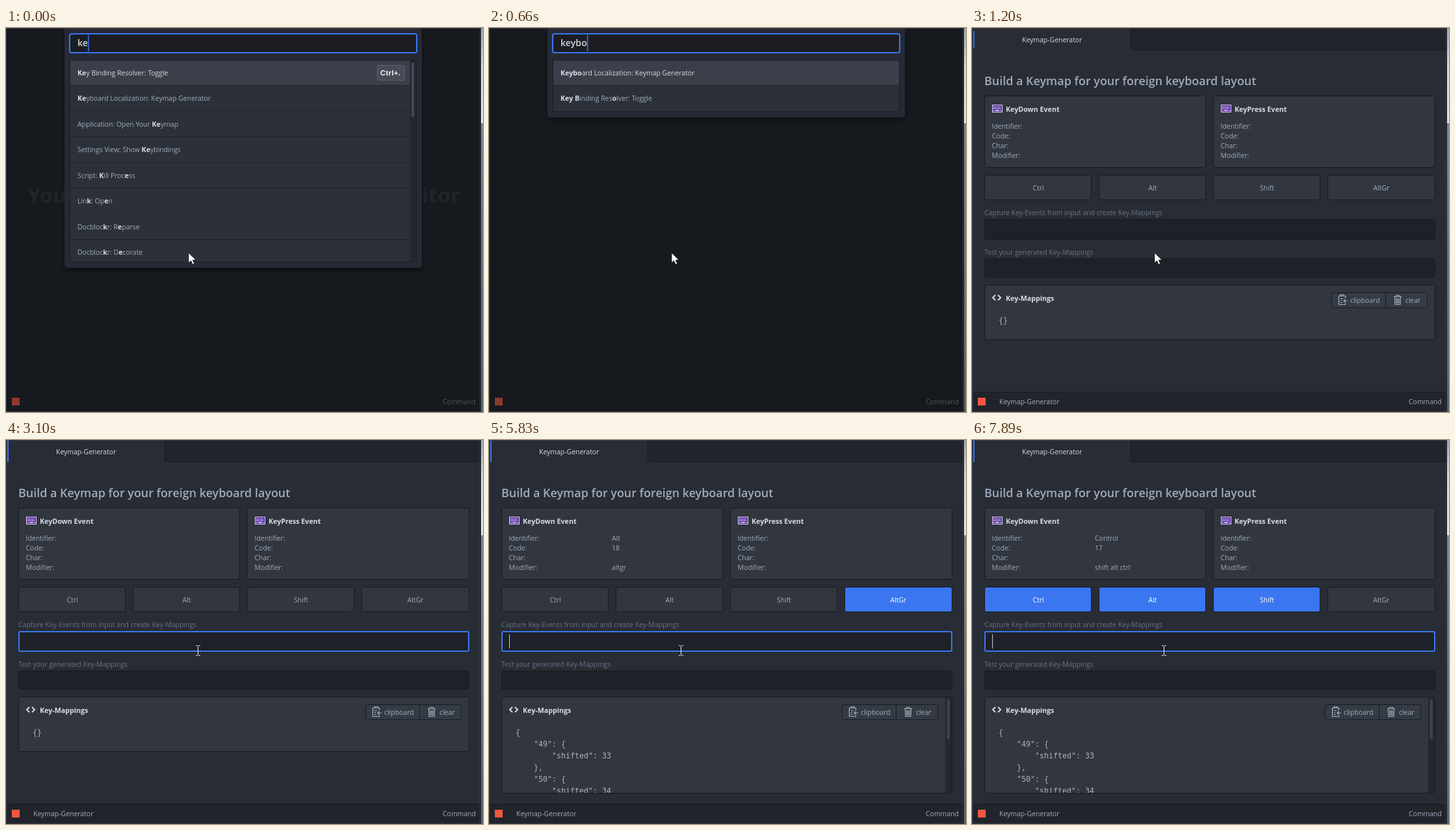
An HTML page that plays this animation: 734 by 591 pixels, repeating every 8 s.

```html
<!DOCTYPE html>
<html lang="en">
<head>
<meta charset="utf-8">
<title>Keymap Generator</title>
<style>
html, body { margin: 0; width: 734px; height: 591px; overflow: hidden; background: #16191d; }
svg { display: block; }
text { font: 10.45px "Open Sans", "Noto Sans", sans-serif; fill: #a1abbc; white-space: pre; }
.bold { font-weight: 700; font-size: 10.7px; fill: #d7dce6; }
.bright { fill: #d7dae0; }
.faint { fill: #6a7384; }
.mid { text-anchor: middle; }
.h1 { font-size: 17.93px; font-weight: 600; }
.tip { font-size: 32.5px; font-weight: 700; fill: #212429; }
.query { font-size: 14.2px; font-weight: 600; fill: #cdd2dc; }
.entry { font-size: 14.2px; fill: #c5cad3; }
.code { font: 11.63px "DejaVu Sans Mono", "Noto Sans Mono", monospace; fill: #abb2bf; }
.kbd { font: 700 11px "Liberation Sans", Arial, sans-serif; letter-spacing: .5px; fill: #fff; }
.card { fill: #31363f; stroke: #181a1f; }
.field { fill: #1e2127; stroke: #181a1f; }
.icon { fill: none; stroke: #a9b2c0; stroke-width: 1.2; }
</style>
</head>
<body>
<svg id="stage" width="734" height="591" viewBox="0 0 734 591"></svg>
<script>
const LOOP = 8000;
const BLUE = '#3a76f0';

const rect = (x, y, w, h, attrs = '') => `<rect x="${x}" y="${y}" width="${w}" height="${h}" ${attrs}/>`;
const text = (x, y, str, cls = '', attrs = '') => `<text x="${x}" y="${y}" class="${cls}" ${attrs}>${str}</text>`;
const path = (d, attrs = '') => `<path d="${d}" ${attrs}/>`;

/* ---------- static parts ---------- */

const defs = `<defs>
  <linearGradient id="light" x2="0" y2="1"><stop stop-color="#a3a7ad"/><stop offset=".4" stop-color="#d6d8da"/><stop offset="1" stop-color="#e4e5e7"/></linearGradient>
  <linearGradient id="slate" x2="0" y2="1"><stop stop-color="#7b8791"/><stop offset="1" stop-color="#586570"/></linearGradient>
  <filter id="shadow" x="-10%" y="-10%" width="120%" height="130%"><feDropShadow dx="0" dy="4" stdDeviation="4" flood-opacity=".4"/></filter>
  <clipPath id="listClip">${rect(98, 49, 535, 312)}</clipPath>
  <clipPath id="codeClip">${rect(20, 396, 692, 147)}</clipPath>
</defs>`;

const desktop = rect(730, 0, 4, 148, 'fill="url(#light)"') + rect(730, 148, 4, 443, 'fill="url(#slate)"')
  + rect(730, 147, 4, 1, 'fill="#4b5057"') + rect(730, 0, 1, 591, 'fill="#181b20"');

const frame = rect(.5, .5, 729, 590, 'fill="none" stroke="#343b47"');

const finder = `<g id="finder">
  ${rect(0, 0, 730, 591, 'fill="#16191d"')}
  <g id="tip">${text(33, 269, 'You can run tools', 'tip')}${text(699, 269, 'right in the editor', 'tip', 'text-anchor="end"')}</g>
  ${rect(9, 569, 12, 12, 'fill="#8c3a2e"')}
  ${text(672, 579, 'Command', '', 'style="fill:#50555d"')}
  <g filter="url(#shadow)"><path id="sheet" fill="#282c34"/></g>
  ${rect(98, 9, 534, 29, `rx="3" fill="#1b1d23" stroke="${BLUE}" stroke-width="2"`)}
  ${text(110, 28, '', 'query', 'id="query"')}
  ${rect(0, 11, 1.5, 25, `id="queryCaret" fill="${BLUE}"`)}
  <g id="list" clip-path="url(#listClip)"></g>
</g>`;

const keyboardIcon = x => rect(x + .5, 118.5, 15, 11, 'fill="#54249c" stroke="#dcd8f8"')
  + [121.5, 124].map(y => path(`M${x + 2} ${y}h12`, 'stroke="#f0f1fa" stroke-width="1.4" stroke-dasharray="1.4 1"')).join('')
  + path(`M${x + 2} 127h1.5m1.5 0h6m1.5 0h1.5`, 'stroke="#f0f1fa" stroke-width="1.4"');

const rowY = i => 155 + 15 * i;
const labels = ['Identifier:', 'Code:', 'Char:', 'Modifier:'];

const eventCard = (x, w, title, id) => rect(x + .5, 104.5, w, 110, 'rx="3" class="card"')
  + keyboardIcon(x + 12) + text(x + 33, 129, title, 'bold')
  + labels.map((s, i) => text(x + 11.5, rowY(i), s) + text(x + 170, rowY(i), '', '', `id="${id}${i}"`)).join('');

const modifiers = ['Ctrl', 'Alt', 'Shift', 'AltGr'];
const modifierButton = (name, i) => {
  const x = 19.5 + 176 * i;
  return rect(x, 226.5, i === 3 ? 165 : 164, 38, `rx="3" class="card" id="box${name}"`)
    + text(x + 82.5, 249.8, name, 'mid', `id="label${name}"`);
};

const tools = `<g id="tools">
  ${rect(553.5, 407.5, 147, 23, 'rx="3" fill="#353b45" stroke="#181a1f"')}
  ${path('M636.5 408v22', 'stroke="#181a1f"')}
  <g class="icon">
    ${path('M574.5 416v-3.5h-10v13h10v-2M567 412.5v-2h5v2zM578 420h-6m2.500-2.500l-2.500 2.500 2.500 2.500M567 416.500h4M567 419.500h2M567 422.500h3')}
    ${path('M649 413.5h12M652.500 413v-1.500h5v1.500M650.500 414l.5 11.500h8l.5-11.500M653 416v8M655 416v8M657 416v8')}
  </g>
  ${text(582, 423, 'clipboard')}${text(667, 423, 'clear')}
</g>`;

const tool = `<g id="tool">
  ${rect(0, 0, 730, 591, 'fill="#282c34"')}
  ${rect(245, 1, 485, 32, 'fill="#21252b"')}
  ${path('M244.500 1v32.500H730', 'fill="none" stroke="#181a1f"')}
  ${rect(2, 1, 2, 33, `id="tabMark" fill="${BLUE}"`)}
  ${text(77, 22, 'Keymap-Generator', 'bright')}
  ${rect(1, 560, 729, 30, 'fill="#21252b"')}${rect(1, 560, 729, 1, 'fill="#181a1f"')}
  ${rect(9, 569, 12, 12, 'fill="#f4573f"')}
  ${text(42, 579, 'Keymap-Generator')}${text(672, 579, 'Command')}
  <g id="page">
    ${text(19, 87.5, 'Build a Keymap for your foreign keyboard layout', 'h1')}
    ${eventCard(19, 340, 'KeyDown Event', 'down')}
    ${eventCard(371, 341, 'KeyPress Event', 'press')}
    ${modifiers.map(modifierButton).join('')}
    ${text(19, 288, 'Capture Key-Events from input and create Key-Mappings', 'faint')}
    ${rect(19.5, 294.5, 693, 31, 'rx="3" class="field"')}
    ${rect(20, 295, 692, 30, `rx="2" id="focus" fill="none" stroke="${BLUE}" stroke-width="2"`)}
    ${text(31, 315, '', 'entry', 'id="entry"')}
    ${rect(31, 299, 1, 22, 'id="caret" fill="#c5cad3"')}
    ${text(19, 349, 'Test your generated Key-Mappings', 'faint')}
    ${rect(19.5, 355.5, 693, 28, 'rx="3" class="field"')}
    ${rect(19.5, 395.5, 693, 84, 'rx="3" class="card" id="mapCard"')}
    ${path('M36 411l-4 4 4 4M40 411l4 4-4 4', 'fill="none" stroke="#d7dae0" stroke-width="2"')}
    ${text(52, 420, 'Key-Mappings', 'bold')}
    ${tools}
    <g id="code" clip-path="url(#codeClip)"></g>
    <g id="scroll">
      ${rect(702, 396, 10, 0, 'id="track" fill="#23272e"')}
      ${rect(704.5, 399, 4.500, 0, 'id="thumb" rx="2" fill="#3c424d"')}
    </g>
  </g>
</g>`;

const pointers = path('M0 0v15.500l3.600-3.400 2.500 5.600 2.600-1.100-2.500-5.500h5z', 'id="arrow" fill="#fff" stroke="#111" stroke-width=".7"')
  + path('M-3.500 -7.500h2.500l1 1 1-1h2.500M0 -6.500v13M-3.500 7.500h2.500l1-1 1 1h2.500', 'id="beam" fill="none" stroke="#f2f2f2"');

stage.innerHTML = defs + desktop + finder + tool + frame + pointers;
const $ = id => document.getElementById(id);
const set = (id, attrs) => { for (const k in attrs) $(id).setAttribute(k, attrs[k]); };
const show = (id, on) => { $(id).style.display = on ? '' : 'none'; };

/* ---------- timeline: each step changes part of the state ---------- */

/* Asterisks enclose the matched letters. */
const lists = {
  ke: ['*Ke*y Binding Resolver: Toggle', '*Ke*yboard Localization: Keymap Generator',
    'Application: Open Your *Ke*ymap', 'Settings View: Show *Ke*ybindings', 'Script: *K*ill Proc*e*ss',
    'Lin*k*: Op*e*n', 'Docbloc*k*r: R*e*parse', 'Docbloc*k*r: D*e*corate'],
  key: ['*Key* Binding Resolver: Toggle', '*Key*board Localization: Keymap Generator',
    'Application: Open Your *Key*map', 'Settings View: Show *Key*bindings', 'Mar*k*down Pr*e*view: Cop*y* Html',
    'Pac*k*age G*e*nerator: Generate S*y*ntax Theme', 'Boo*k*marks: S*e*lect Ever*y* Line', 'Stac*k*: R*e*vert St*y*le'],
  keyb: ['*Keyb*oard Localization: Keymap Generator', '*Key B*inding Resolver: Toggle', 'Settings View: Show *Keyb*indings'],
  keybo: ['*Keybo*ard Localization: Keymap Generator', '*Key B*inding Res*o*lver: Toggle'],
  keyboa: ['*Keyboa*rd Localization: Keymap Generator'],
  keyboar: ['*Keyboar*d Localization: Keymap Generator']
};

const none = ['', '', '', ''];
const typed = (n, press, ch) => ({
  down: [`U+003${n}`, 48 + n, n, 'shift'],
  press: [`U+00${press.toString(16).toUpperCase()}`, press, ch, 'shift'],
  entry: ch
});

const steps = [
  [0, { view: 'finder', query: 'ke', list: 'ke', tip: 1, pointer: ['arrow', 281, 346], focus: 0, caret: false,
    down: none, press: none, keys: [], entry: '', maps: 0, bottom: 479.5, mark: [5, 30] }],
  [120, { query: 'key' }],
  [240, { list: 'key' }],
  [390, { query: 'keyb', list: 'keyb', tip: .5 }],
  [510, { tip: 0 }],
  [660, { query: 'keybo', list: 'keybo' }],
  [780, { query: 'keyboar', list: 'keyboa' }],
  [930, { list: 'keyboar' }],
  [1080, { view: 'blank' }],
  [1200, { view: 'tool' }],
  [1350, { mark: [2, 32] }],
  [1470, { mark: [1, 34] }],
  [2310, { pointer: ['arrow', 270, 333] }],
  [2430, { pointer: ['beam', 255.5, 316] }],
  [2580, { pointer: ['beam', 295.5, 324] }],
  [2700, { focus: .5 }],
  [2820, { focus: 1, caret: true }],
  [3100, { caret: false }],
  [3560, { caret: true, down: ['Shift', 16, '', 'shift'], keys: ['Shift'] }],
  [4060, typed(1, 33, '!')],
  [4210, { maps: 1, bottom: 531 }],
  [4360, typed(2, 34, '"')],
  [4480, { maps: 2, bottom: 543.5 }],
  [4600, { ...typed(3, 167, '§'), maps: 3 }],
  [5180, typed(4, 36, '$')],
  [5300, { maps: 4 }],
  [5830, { down: ['Alt', 18, '', 'altgr'], press: none, entry: '', keys: ['AltGr'] }],
  [6100, { keys: [] }],
  [6250, { down: ['Control', 17, '', 'ctrl'], keys: ['Ctrl'], caret: false }],
  [6370, { caret: true }],
  [6520, { keys: [] }],
  [6670, { keys: ['Ctrl'] }],
  [7100, { keys: [] }],
  [7220, { down: ['Shift', 16, '', 'shift'], keys: ['Shift'] }],
  [7620, { down: ['Alt', 18, '', 'shift alt'], keys: ['Shift', 'Alt'] }],
  [7890, { down: ['Control', 17, '', 'shift alt ctrl'], keys: ['Shift', 'Alt', 'Ctrl'] }]
];

/* ---------- drawing ---------- */

const shifted = [33, 34, 167, 36];

function codeLines(n) {
  if (!n) return [[0, '{}']];
  const body = shifted.slice(0, n).flatMap((code, i) => [
    [1, `"${49 + i}": {`], [2, `"shifted": ${code}`], [1, i < n - 1 ? '},' : '}']]);
  return [[0, '{'], ...body, [0, '}']];
}

function drawList(items) {
  const long = items.length > 7;
  const right = long ? 621 : 631;
  const bottom = long ? 360 : 49.5 + 39.5 * items.length;
  const sheetBottom = bottom + 9;
  set('sheet', { d: `M90 1H640V${sheetBottom - 6}q0 6 -6 6H96q-6 0 -6 -6z` });
  let out = items.map((item, i) => {
    const y = 49.5 + 39.5 * i;
    const words = item.replace(/\*(.+?)\*/g, '<tspan class="bold">$1</tspan>');
    let row = rect(98.5, y, right - 98, 39.5, `fill="${i ? '#2c3139' : '#3a3f4a'}"`)
      + rect(98.5, Math.floor(y + 39), right - 98, 1, 'fill="#1b1e23"')
      + text(110, Math.round(y + 23.4), words, i ? '' : 'bright');
    if (item.includes('Resolver'))
      row += rect(right - 49.5, Math.floor(y + 8) + .5, 42, 23, `rx="2" fill="${i ? '#3d424c' : '#474d58'}" stroke="#5a606c"`)
        + text(right - 45, y + 23.7, 'Ctrl+.', 'kbd');
    return row;
  }).join('');
  if (long) out += rect(622, 50, 10, 310, 'fill="#23272e"') + rect(624, 53, 4, 84, 'rx="2" fill="#434954"');
  $('list').innerHTML = out + rect(98.5, 49.5, 533, bottom - 49.5, 'fill="none" stroke="#1b1e23"');
}

function drawFinder(s) {
  $('tip').style.opacity = s.tip;
  $('query').textContent = s.query;
  set('queryCaret', { x: 110 + $('query').getComputedTextLength() });
  drawList(lists[s.list]);
}

function drawTool(s) {
  show('page', s.view === 'tool');
  set('tabMark', { y: s.mark[0], height: s.mark[1] - s.mark[0], opacity: s.mark[0] > 1 ? .85 : 1 });
  for (const id of ['down', 'press']) s[id].forEach((v, i) => { $(id + i).textContent = v; });
  for (const name of modifiers) {
    const on = s.keys.includes(name);
    $('box' + name).style.fill = on ? BLUE : '';
    $('label' + name).style.fill = on ? '#fff' : '';
  }
  $('focus').style.opacity = s.focus;
  $('entry').textContent = s.entry;
  show('caret', s.caret);
  set('caret', { x: 31 + (s.entry && Math.ceil($('entry').getComputedTextLength())) });

  const lines = codeLines(s.maps);
  const height = s.bottom - 395.5;
  $('code').innerHTML = lines.map(([depth, str], i) => text(41 + 28 * depth, 454 + 18 * i, str, 'code')).join('');
  set('mapCard', { height });
  show('scroll', s.maps);
  set('tools', { transform: `translate(${s.maps ? -10 : 0} 0)` });
  set('track', { height: height - 1 });
  set('thumb', { height: height * height / (66 + 18 * lines.length) - 7 });
}

function draw(s) {
  const finding = s.view === 'finder';
  show('finder', finding);
  show('tool', !finding);
  if (finding) drawFinder(s); else drawTool(s);
  const [kind, x, y] = s.pointer;
  for (const id of ['arrow', 'beam']) show(id, id === kind);
  set(kind, { transform: `translate(${x} ${y})` });
}

const start = performance.now();
let shown = 0;

function tick() {
  const t = (performance.now() - start) % LOOP;
  const count = steps.filter(([at]) => at <= t).length;
  if (count !== shown) {
    shown = count;
    draw(Object.assign({}, ...steps.slice(0, count).map(step => step[1])));
  }
  requestAnimationFrame(tick);
}
tick();
</script>
</body>
</html>
```
